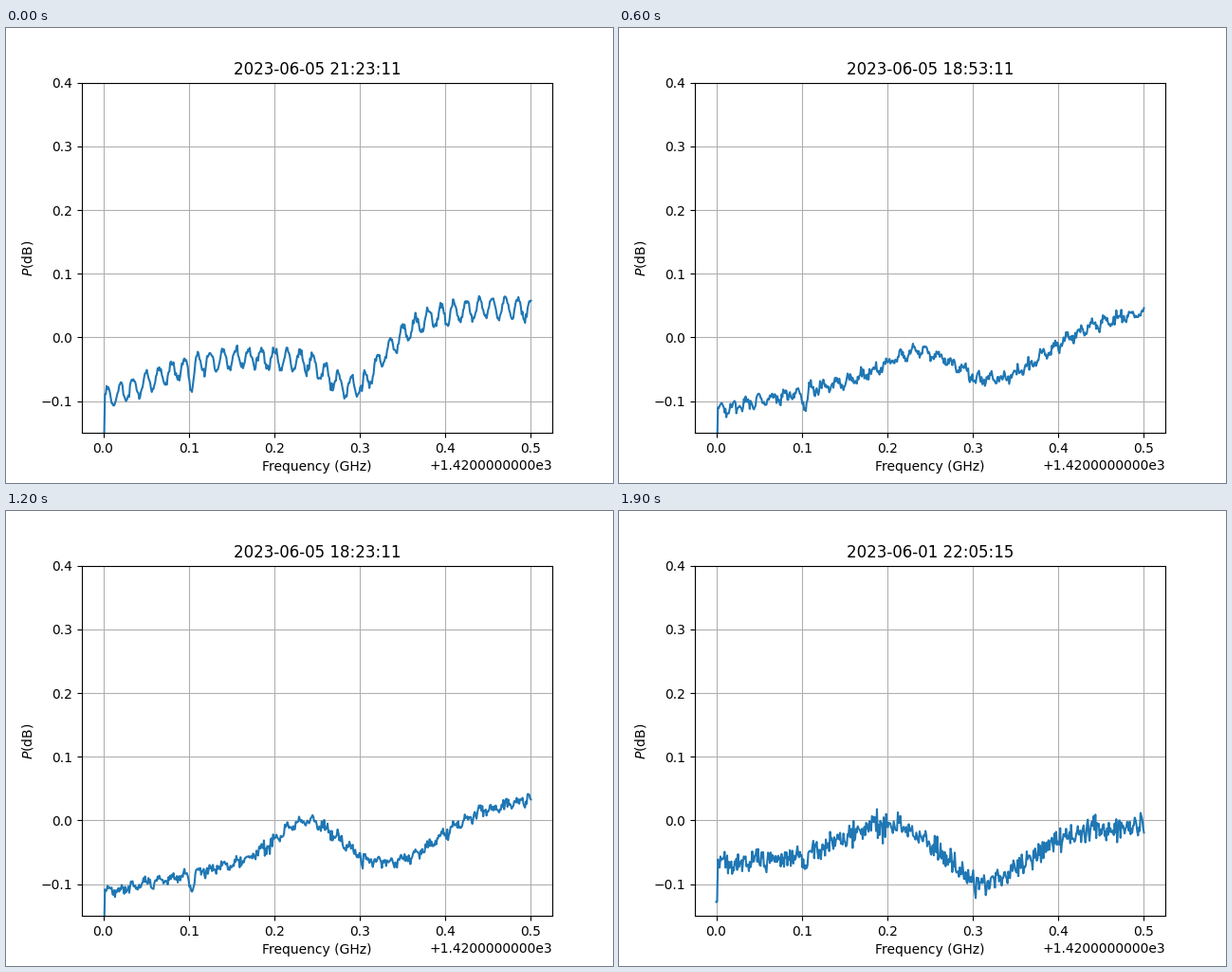
Animation, 640 px wide and 480 px high, one loop 2000 ms. Source, as a matplotlib script:

```python
import numpy as np
import matplotlib.pyplot as plt
from matplotlib.animation import FuncAnimation
from matplotlib.ticker import FixedFormatter

SAMPLES = 512
BASE = 1420
freq = np.linspace(0, 0.5, SAMPLES)

# Half-hour steps from each day's reference time, in playing order
EVENING = [6, 6, 3, -1, 2, 7, 1, 8, 4, -2, 9, -3, 0, 10, -4, 11, 5]
FIRST_DAY = [1, -1, 0]
SWEEPS = [("05", k) for k in EVENING] + [("01", k) for k in FIRST_DAY]


def bell(center, width):
    return np.exp(-((freq - center) / width) ** 2 / 2)


def slope(left, right):
    return left + (right - left) * freq / freq[-1]


def noise(seed):
    return np.random.default_rng(seed).normal(size=SAMPLES)


# Features of the receiver that every sweep shares
NOTCHES = (np.interp(freq, [.098, .102, .106, .108], [0, -23, -23, 0])
           + np.interp(freq, [.3, .303, .305], [0, -24, 0]))
RIPPLE = np.cos(2 * np.pi * (freq - .02) / .015)
GRAIN = noise(1)


def first_day():
    level = slope(-70, -8) + 42 * bell(.205, .05) - 68 * bell(.315, .045)
    return level + 2 * RIPPLE, 9


def dusk(k):
    """The hump near the middle sinks as the dip drifts down the band."""
    level = (slope(-114 - 1.4 * k ** 2, 34 + 5 * k)
             + (48 - 21 * k) * bell(.235, .03)
             - 52 * bell(.345 - .009 * k, .045))
    return level + (5 + 1.25 * k) * RIPPLE, 3.5


def night():
    swell = 14 * np.cos(2 * np.pi * (freq - .12) / .29)
    level = slope(-85, 50) + swell - 60 * bell(.295, .028)
    return level + 16 * RIPPLE, 2.5


def sweep(day, k):
    """Power in dB for one recording."""
    if day == "01":
        level, rough = first_day()
    elif k < 5:
        level, rough = dusk(max(k, 0))
    else:
        level, rough = night()
    power = level + NOTCHES + 2.5 * GRAIN + rough * noise(100 + k)
    power[:2] = level[0] - 57
    return power / 1000


def stamp(day, k):
    start, seconds = (22 * 60 + 5, 15) if day == "01" else (18 * 60 + 23, 11)
    hour, minute = divmod(start + 30 * k, 60)
    return f"2023-06-{day} {hour:02d}:{minute:02d}:{seconds}"


fig, ax = plt.subplots(figsize=(6.4, 4.8), dpi=100)
line, = ax.plot(BASE + freq, np.zeros(SAMPLES))
ticks = np.arange(6) / 10
ax.set_xticks(BASE + ticks)
labels = FixedFormatter([f"{t:.1f}" for t in ticks])
labels.set_offset_string("+1.4200000000e3")
ax.xaxis.set_major_formatter(labels)
ax.set_xlim(BASE - .025, BASE + .525)
ax.set_ylim(-.15, .4)
ax.set_xlabel("Frequency (GHz)")
ax.set_ylabel("$P$(dB)")
ax.grid(True)
title = ax.set_title("")


def update(i):
    line.set_ydata(sweep(*SWEEPS[i]))
    title.set_text(stamp(*SWEEPS[i]))
    return line, title


anim = FuncAnimation(fig, update, frames=len(SWEEPS), interval=100,
                     repeat=True, repeat_delay=0)
plt.show()
```
